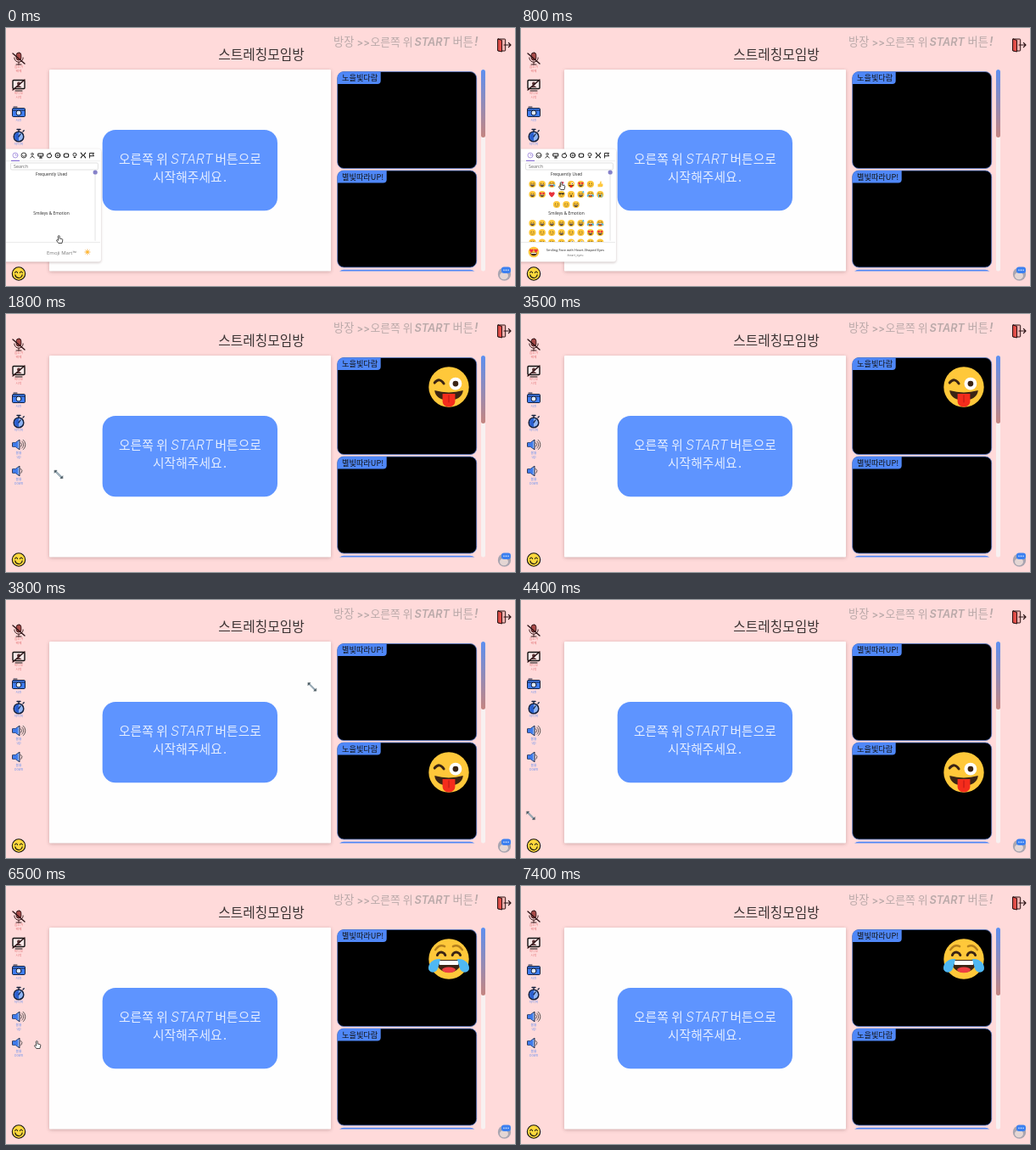
Animation, 600 px wide and 304 px high, one loop 8000 ms. Source, as an HTML page with a canvas:

```html
<!DOCTYPE html>
<html lang="ko">
<head>
<meta charset="utf-8">
<style>
  html, body { margin: 0; width: 100%; height: 100%; overflow: hidden; background: #ffdada; }
  canvas { display: block; width: 600px; height: 304px; }
</style>
</head>
<body>
<canvas id="stage"></canvas>
<script>
const LOOP = 8000, STEP = 100;
const KR = '"Noto Sans CJK KR", "Noto Sans CJK JP", sans-serif';
const UI = '"Open Sans", sans-serif';
const BLUE = '#5e94ff', INK = '#111', RED = '#e27478', LABEL = '#6c92ee', YELLOW = '#ffc83a';
const canvas = document.getElementById('stage');
const ctx = canvas.getContext('2d');
const dpr = window.devicePixelRatio || 1;
canvas.width = 600 * dpr;
canvas.height = 304 * dpr;

function text(str, x, y, font, color, align = 'left') {
  ctx.font = font;
  ctx.fillStyle = color;
  ctx.textAlign = align;
  ctx.fillText(str, x, y);
}

function paint(fill, stroke, width = 1) {
  if (fill) { ctx.fillStyle = fill; ctx.fill(); }
  if (stroke) { ctx.strokeStyle = stroke; ctx.lineWidth = width; ctx.stroke(); }
}

function box(x, y, w, h, r, fill, stroke, width) {
  ctx.beginPath();
  ctx.roundRect(x, y, w, h, r);
  paint(fill, stroke, width);
}

function oval(x, y, rx, ry, fill, stroke, width) {
  ctx.beginPath();
  ctx.ellipse(x, y, rx, ry, 0, 0, 7);
  paint(fill, stroke, width);
}

function arc(x, y, r, from, to, stroke, width) {
  ctx.beginPath();
  ctx.arc(x, y, r, from * Math.PI, to * Math.PI);
  paint(null, stroke, width);
}

function shape(d, fill, stroke, width) {
  const p = new Path2D(d);
  if (fill) { ctx.fillStyle = fill; ctx.fill(p); }
  if (stroke) { ctx.strokeStyle = stroke; ctx.lineWidth = width || 1; ctx.stroke(p); }
}

function at(x, y, scale, draw) {
  ctx.save();
  ctx.translate(x, y);
  ctx.scale(scale, scale);
  ctx.lineCap = ctx.lineJoin = 'round';
  draw();
  ctx.restore();
}

function shadowed(blur, dy, draw) {
  ctx.save();
  ctx.shadowColor = 'rgba(90,50,50,.3)';
  ctx.shadowBlur = blur * dpr;
  ctx.shadowOffsetY = dy * dpr;
  draw();
  ctx.restore();
}

// Emoji are drawn on a face of radius 24.
const BROWN = '#664e27', DARK = '#3b2414';
const HEART = 'M0 7C-12-2-6-9 0-4C6-9 12-2 0 7Z';
const disc = () => oval(0, 0, 24, 24, YELLOW);
const dots = () => [-8, 8].forEach(x => oval(x, -5, 3, 4.5, BROWN));
const grin = () => {
  shape('M-15 3H15C14 21-14 21-15 3Z', DARK);
  shape('M-12 4H12V8H-12Z', '#fff');
};
const squint = () => [-9, 9].forEach(x => arc(x, -3, 5, 1.1, 1.9, DARK, 3));
const tear = (x, dir) => at(x, 5, 1, () => {
  ctx.scale(dir, 1);
  shape('M8-5C-1-6-8 1-6 8C-3 13 4 11 5 6Z', '#4fb8f3');
});

const emoji = {
  smile() { disc(); dots(); arc(0, 0, 13, .12, .88, BROWN, 3); },
  grin() { disc(); dots(); grin(); },
  laugh() { disc(); squint(); grin(); },
  sweat() { emoji.laugh(); oval(17, -16, 5, 7, '#4fb8f3'); },
  joy() {
    disc();
    [-1, 1].forEach(s => shape(`M${s * 5}-15Q${s * 11}-18 ${s * 16}-11`, null, '#b5801e', 2.5));
    squint();
    shape('M-15 1H15C16 21-16 21-15 1Z', DARK);
    shape('M-13 2H13L11 7H-11Z', '#fff');
    oval(0, 13, 8, 3.5, '#ee3f43');
    tear(-18, 1);
    tear(18, -1);
  },
  wink() {
    disc();
    shape('M-17-5Q-11-12-6-4', null, DARK, 3);
    oval(8, -4, 7.5, 7.5, '#fff');
    oval(8, -4, 3.4, 3.4, DARK);
    shape('M-17 4Q0 9 17 4C16 20-16 20-17 4Z', DARK);
    shape('M-7.5 8H7.5V17C7.5 26-7.5 26-7.5 17Z', '#f42c1c');
    shape('M0 10V18', null, '#c81c18', 1.4);
  },
  love() {
    disc();
    [-10, 10].forEach(x => at(x, -6, 1.25, () => shape(HEART, '#ee2f3c')));
    grin();
  },
  cool() { disc(); shape('M-20-9H20L16 2H4L0-4L-4 2H-16Z', '#222'); arc(0, 2, 12, .15, .85, BROWN, 3); },
  scream() { disc(); dots(); oval(0, 11, 5, 8, DARK); [-17, 17].forEach(x => oval(x, 12, 5, 10, '#f4a63a')); },
  cry() { disc(); squint(); oval(0, 10, 7, 6, DARK); [-11, 11].forEach(x => box(x - 3, -1, 6, 23, 3, '#4fb8f3')); },
  heart() { at(0, 0, 2.9, () => shape(HEART, '#e8323c')); },
  party() { shape('M-20 20L-8-12L12 8Z', '#f2a93b'); oval(8, -10, 8, 8, '#e04a68'); oval(17, 5, 4, 4, '#5a8df0'); },
  thumb() { shape('M-16-1H-5L3-22Q12-20 7-3H18Q22 16 12 19H-16Z', '#ffc83d'); },
};
const draw = (kind, x, y, r) => at(x, y, r / 24, emoji[kind]);

const ROWS = [
  [184, 'laugh grin joy party wink love smile thumb'],
  [196, 'grin love heart cool scream sweat joy cry'],
  [208, 'smile smile laugh', 42],
  [230, 'grin grin grin laugh laugh sweat joy joy'],
  [241, 'smile smile smile grin smile smile love love'],
  [252.5, 'smile smile grin smile wink wink laugh smile'],
];

const PREVIEWS = {
  love: ['Smiling Face with Heart-Shaped Eyes', ':heart_eyes:'],
  wink: ['Winking Face with Tongue', ':wink_tongue:'],
  joy: ['Face with Tears of Joy', ':joy:'],
};

const CATEGORIES = [
  () => { oval(0, 0, 3, 3, null, '#8b72d6', .7); shape('M0-1.5V0H1.3', null, '#8b72d6', .6); },
  () => { oval(0, 0, 3, 3, null, INK, .8); arc(0, 0, 1.5, 0, 1, INK, .6); },
  () => { oval(0, -1.3, 1.3, 1.3, null, INK, .7); shape('M-2.2 3Q0-1 2.2 3', null, INK, .8); },
  () => shape('M-2.8-2H2.8V1H-2.8ZM0 1V3M-1.5 3H1.5', null, INK, 1),
  () => { oval(0, .4, 2.7, 2.5, null, INK, .9); shape('M0-2L1.5-3', null, INK, .8); },
  () => { oval(0, 0, 2.9, 2.9, null, INK, 1); oval(0, 0, 1, 1, null, INK, .6); },
  () => box(-2.7, -2, 5.4, 4.2, 1.5, null, INK, 1.1),
  () => { oval(0, -.8, 2, 2, null, INK, .8); shape('M-.8 2.5H.8', null, INK, 1); },
  () => shape('M-2.7-2.8L-.5 0L-2.7 2.8M2.7-2.8L.5 0L2.7 2.8', null, INK, 1.1),
  () => shape('M-2.4 3V-2.6H2.7L1.3-1L2.7 .8H-2.4', null, INK, .9),
];

function drawPicker(loaded, preview) {
  shadowed(3, 1, () => box(-3, 142.5, 115, 133, 3, '#fff'));
  CATEGORIES.forEach((icon, i) => at(11 + i * 10, 150, 1, icon));
  ctx.fillStyle = '#e3e3e3';
  ctx.fillRect(0, 156.5, 111, .6);
  ctx.fillRect(0, 252, 111, .7);
  ctx.fillStyle = '#8b72d6';
  ctx.fillRect(6, 155.8, 10, 1.2);
  box(5.5, 159, 103, 8, 1.5, '#fff', '#cfcfcf', .6);
  text('Search', 9, 165, '5.4px ' + UI, '#666');

  ctx.save();
  ctx.beginPath();
  ctx.rect(0, 167.5, 111, 84.5);
  ctx.clip();
  text('Frequently Used', 53.5, 174, '4.9px ' + UI, '#222', 'center');
  text('Smileys & Emotion', 53.5, 219.5, '4.9px ' + UI, '#222', 'center');
  if (loaded) {
    for (const [y, kinds, x = 13.5] of ROWS)
      kinds.split(' ').forEach((kind, i) => draw(kind, x + i * 11.4, y, 4.1));
  }
  ctx.restore();
  box(104.3, 168, 1.6, 83, .8, '#eee');
  oval(105.2, 170, 2.6, 2.6, '#8581c9');

  if (preview) {
    draw(preview, 15, 264, 6.3);
    text(PREVIEWS[preview][0], 64, 263, '4px ' + UI, '#222', 'center');
    text(PREVIEWS[preview][1], 64, 268.8, '3.6px ' + UI, '#666', 'center');
  } else {
    text('Emoji Mart™', 48, 267, '6px ' + UI, '#777');
    at(96, 264, 1, () => {
      for (let i = 0; i < 8; i++) {
        ctx.rotate(Math.PI / 4);
        shape('M0-2.2L0-3.1', null, '#f5b04c', .9);
      }
      oval(0, 0, 1.8, 1.8, '#ffb52e');
    });
  }
}

function caption(lines, y, color) {
  lines.forEach((line, i) => text(line, 15, y + i * 5, '3.7px ' + KR, color, 'center'));
}

const slash = () => shape('M-7-6L7 6', null, '#2b1215', 1.4);
const speaker = () => {
  shape('M-7-2.3H-4L1-5.8V5.8L-4 2.3H-7Z', '#8fb4f4', '#1d2b4a', 1);
  shape('M-7-2.3H-4L-1-4.4V4.4L-4 2.3H-7Z', '#3f7bea');
};

const TOOLS = [
  [36, RED, ['음소거', '해제'], () => {
    box(-2.8, -7, 5.6, 9, 2.8, '#a84a48', '#3a1a1c', 1);
    arc(0, -1, 5.2, 0, 1, '#3a1a1c', 1);
    shape('M0 4.2V7M-3 7H3', null, '#3a1a1c', 1);
    slash();
  }],
  [67, RED, ['비디오', '시작'], () => {
    box(-7, -5.5, 14, 10, 1, '#f8e9e9', INK, 1.4);
    oval(0, -1.5, 2, 2, '#5a3335');
    shape('M-3.5 3Q0-1 3.5 3Z', '#5a3335');
    shape('M-4 7H4', null, INK, 1);
    ctx.scale(1, -1);
    slash();
  }],
  [99, LABEL, ['사진'], () => {
    box(-7.5, -4.5, 15, 10, 1.2, '#3f7df0', '#14213d', 1);
    shape('M-6-6H-2M-7-2H7', null, '#14213d', 1);
    oval(0, 1, 3, 3, '#dce9ff', '#14213d', 1);
  }],
  [127, LABEL, ['타이머'], () => {
    oval(0, 1, 5.8, 5.8, '#8fb4f4', '#14213d', 1.5);
    shape('M0 1V-4A5 5 0 0 0 0 6Z', '#2a5fcf');
    shape('M0 1L2-2M0-5V-7.5M-2-7.5H2M5-5L6.2-6.2', null, '#14213d', 1.3);
  }],
  [154, LABEL, ['볼륨', 'Up'], () => {
    speaker();
    [3, 5.2, 7.4].forEach(r => arc(.5, 0, r, -.28, .28, '#333', .8));
  }],
  [185, LABEL, ['볼륨', 'Down'], () => { speaker(); arc(.5, 0, 3.3, -.28, .28, '#333', .8); }],
];

function drawTools() {
  for (const [y, color, lines, icon] of TOOLS) {
    at(15, y, 1, icon);
    caption(lines, y + 11, color);
  }
  at(15, 289.5, 1, () => {
    oval(0, 0, 7.7, 7.7, '#ffd83d', INK, 1.1);
    [-2.9, 2.9].forEach(x => arc(x, -1, 1.5, 1, 2, INK, 1));
    arc(0, .7, 4.2, .05, .95, INK, 1.1);
  });
  at(587, 20, 1, () => {
    box(-7.3, -7, 9, 14, .8, '#f6b3b0', '#2a1214', 1);
    shape('M-7-7L-2.5-5.5V8L-7 6.8Z', '#e24e49', '#2a1214', 1);
    shape('M0 0H8M5.4-2.6L8 0L5.4 2.6', null, '#2a1214', 1.2);
  });
  oval(587.5, 290, 7.7, 7.7, '#a9a5b0');
  oval(587, 292, 5, 4.2, '#e4d6d4');
  box(584, 281.5, 11, 7.5, 3, '#3c80f0');
  [587, 589.5, 592].forEach(x => oval(x, 285.2, .7, .7, '#fff'));
}

function drawRoom() {
  ctx.fillStyle = '#ffdada';
  ctx.fillRect(0, 0, 600, 304);
  text('스트레칭모임방', 301, 36.5, '300 15.8px ' + KR, '#3c3434', 'center');

  const gray = '#baa9a9', note = '500 13.2px ' + KR;
  text('방장', 386, 21, note, gray);
  text('>>', 413.5, 20.5, '600 11.5px Inter, sans-serif', gray);
  text('오른쪽 위', 429.5, 21, '500 12.8px ' + KR, gray);
  text('START', 481.5, 20.5, 'italic 600 12.7px Inter, sans-serif', gray);
  text('버튼', 526.5, 21, note, gray);
  text('!', 552, 20.5, 'italic 600 14px Inter, sans-serif', gray);

  shadowed(4, 1, () => box(51, 49, 332, 237.5, 1, '#fefefe'));
  box(113.7, 120, 206.3, 95.3, 15.5, BLUE);
  const light = '300 14.8px ' + KR, pale = 'rgba(255,255,255,.84)';
  text('오른쪽 위', 133, 160, light, pale);
  text('START', 194, 160, 'italic 300 16px Inter, sans-serif', pale);
  text('버튼으로', 246.5, 160, light, pale);
  text('시작해주세요', 173, 181, light, pale);
  text('.', 256, 181, light, pale);

  box(560, 49, 5, 237.5, 2.5, '#f8f1f1');
  const fade = ctx.createLinearGradient(0, 49, 0, 129);
  fade.addColorStop(0, '#5d8ff0');
  fade.addColorStop(1, '#c58580');
  box(560, 49, 5, 80, 2.5, fade);
}

const MEMBERS = [['노을빛다람', 51], ['별빛따라UP!', 58]];

function drawCards(swapped) {
  [0, 1].forEach(slot => {
    const y = 51.5 + slot * 116.5;
    const [name, width] = MEMBERS[swapped ? 1 - slot : slot];
    box(390.7, y, 164, 114, 7.5, '#000', '#5579c8', .8);
    box(390.7, y, width, 14.5, [7, 0, 4, 0], '#4f87f7');
    text(name, 396, y + 10.8, '9.2px ' + KR, INK);
  });
  ctx.save();
  ctx.beginPath();
  ctx.rect(388, 284, 170, 2.6);
  ctx.clip();
  box(390.7, 284.8, 164, 20, 7.5, '#4f87f7');
  ctx.restore();
}

// Each path lists time, x and y; the pointer is hidden outside of them.
const PATHS = [
  [[0, 63, 249], [400, 66, 215], [600, 72, 187], [800, 48, 186], [1000, 58, 187],
   [1500, 60, 186], [1800, 62, 189], [2400, 526, 20]],
  [[3600, 588, 8], [4100, 20, 244], [4400, 11.5, 254], [5100, 15, 292], [5200, 15, 292],
   [5600, 57.5, 195.5], [6100, 37, 187], [6800, 37, 187], [7050, 120, 286], [7400, 255, 64]],
];

const POINTERS = {
  hand() {
    shape('M-1.5-4Q-.6-5 .2-4V-1L3.2-.4Q4 0 3.8 1L3 4.5H-1.2L-3.6 1.2Q-3.4 0-1.5 1Z', '#fff', '#222', .8);
  },
  arrow() { shape('M-1.5-3V2.5L-.3 1.4L.6 3.2L1.5 2.8L.7 1H2.4Z', '#fff', '#666', .6); },
  resize() {
    shape('M-3.5-3.5L3.5 3.5', null, '#6f8795', 2);
    shape('M-4.8-4.8H-1.8L-4.8-1.8ZM4.8 4.8H1.8L4.8 1.8Z', '#47565f', '#47565f', .4);
    shape('M-2.4-2.4L2.4 2.4', null, '#d3dde2', .8);
  },
};

function pointerKind(t) {
  if (t < 1600) return 'hand';
  if (t < 5000) return 'resize';
  return t < 5300 || (t >= 5700 && t < 6600) ? 'hand' : 'arrow';
}

function drawPointer(t) {
  for (const path of PATHS) {
    const i = path.findIndex(([time]) => time > t);
    if (i < 1) continue;
    const [a, b] = [path[i - 1], path[i]];
    const k = (t - a[0]) / (b[0] - a[0]);
    at(a[1] + (b[1] - a[1]) * k, a[2] + (b[2] - a[2]) * k, 1, POINTERS[pointerKind(t)]);
  }
}

function previewKind(t) {
  if (t >= 1000) return 'wink';
  return t >= 600 ? 'love' : null;
}

function render(now) {
  const t = Math.floor((now % LOOP) / STEP) * STEP;
  const swapped = t >= 3700;
  ctx.setTransform(dpr, 0, 0, dpr, 0, 0);
  drawRoom();
  drawCards(swapped);
  if (t >= 1600 && t < 5700) draw('wink', 522, swapped ? 203 : 86, 23.7);
  if (t >= 6500) draw('joy', 522, 86, 23.7);
  drawTools();
  if (t < 1600) drawPicker(t >= 200, previewKind(t));
  else if (t >= 5700 && t < 6500) drawPicker(t >= 5800, t >= 5900 ? 'joy' : null);
  drawPointer(t);
}

const start = performance.now();
function tick() {
  render(performance.now() - start);
  requestAnimationFrame(tick);
}
tick();
</script>
</body>
</html>
```
